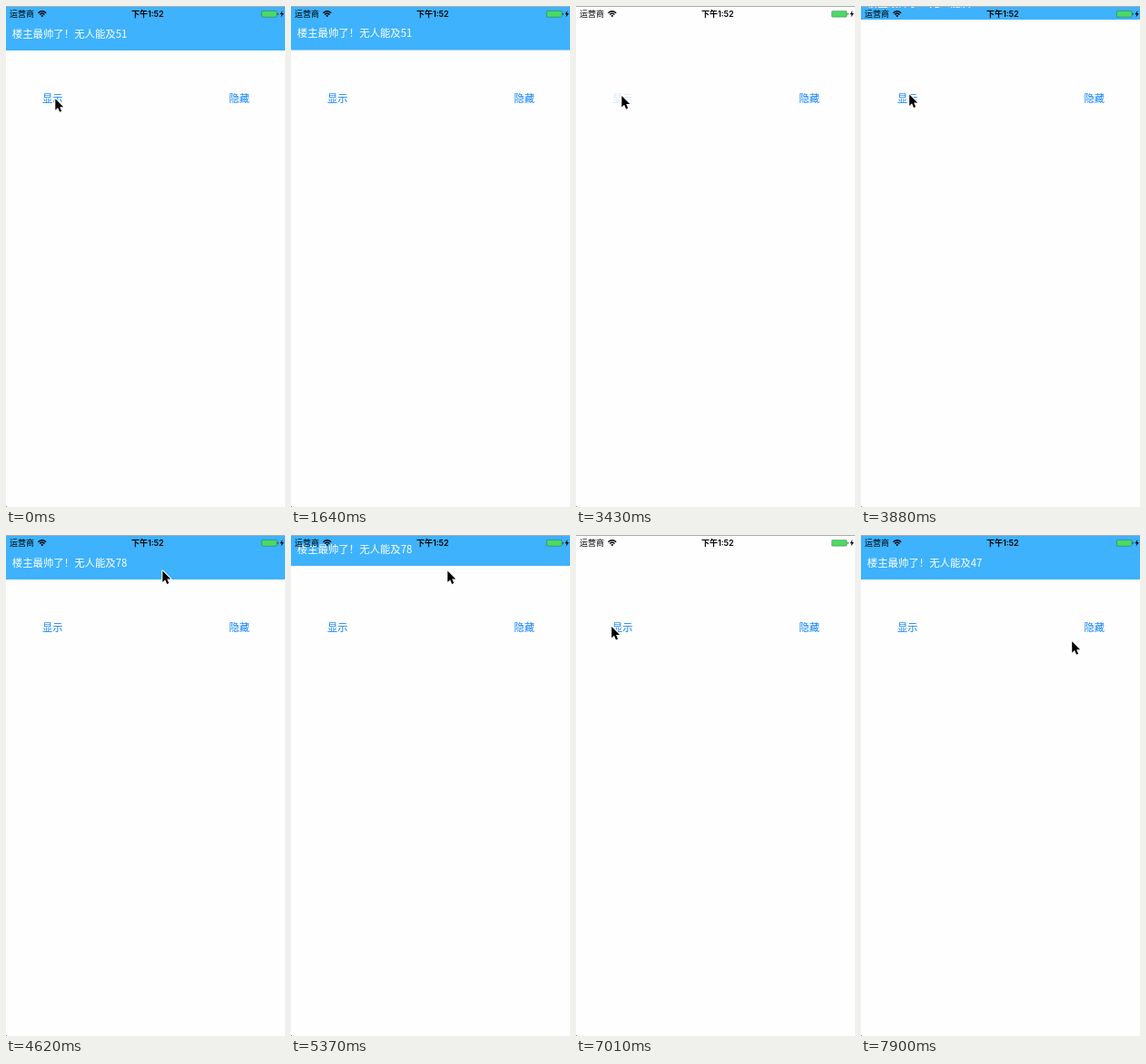
An HTML page that plays this animation: 307x552 px, repeating every 8 s.

```html
<!DOCTYPE html>
<html lang="zh-CN">
<head>
<meta charset="utf-8">
<title>Banner</title>
<style>
  html, body { margin: 0; width: 100%; height: 100%; overflow: hidden; background: #fefefe; }
  svg { display: block; width: 307px; height: 552px; }
  text { font-family: "Noto Sans CJK SC", "Noto Sans CJK", sans-serif; }
  .button { font-size: 11.2px; fill: #0a7ffb; }
  .status { font-size: 9px; }
  .clock { font-family: Inter, "Noto Sans CJK SC", sans-serif; font-weight: 600; text-anchor: middle; }
</style>
</head>
<body>
<svg viewBox="0 0 307 552">
  <rect width="307" height="552" fill="#fefefe"/>
  <text id="show" class="button" x="40" y="106.4">显示</text>
  <text class="button" x="245.6" y="106.4">隐藏</text>

  <g id="banner">
    <rect y="1" width="307" height="48" fill="#3eb2fc"/>
    <text id="message" x="6.8" y="34.9" font-size="11.4" fill="#fff"></text>
  </g>

  <g id="status">
    <text class="status" x="4.1" y="12">运营商</text>
    <g fill="none" stroke="#000" stroke-width="1.3">
      <path d="M35.4 7.7Q39.8 3.8 44.2 7.7"/>
      <path d="M37.1 9.5Q39.8 7.1 42.5 9.5"/>
    </g>
    <path d="M38.3 10.7Q39.8 9.5 41.3 10.7L39.8 12.2Z"/>
    <text class="status clock" x="155.8" y="12">下午1:52</text>
    <rect x="281.4" y="5.4" width="16.6" height="6.8" rx="1.2" fill="#4cd964" stroke="#000" stroke-opacity=".4" stroke-width=".6"/>
    <path d="M298.7 7.4q1 .3 1 1.4t-1 1.4z" fill="#333"/>
    <path d="M304.4 5L301.4 9.2H303.3L302.6 12.6L305.8 8.1H303.8Z"/>
  </g>
  <rect width="307" height="1" fill="#adadad"/>
  <rect y="551" width="1" height="1" fill="#888"/>

  <g id="cursor" stroke-linejoin="round">
    <use href="#arrow" y="1" opacity=".2"/>
    <path id="arrow" d="M0 0V12.4L2.8 9.8L4.8 14.4L6.9 13.5L4.9 9H8.9Z"
          stroke="#fff" stroke-width="2" paint-order="stroke"/>
  </g>
</svg>
<script>
  const LOOP = 8000;
  const TICK = 149;         // the screen is refreshed at this interval
  const SLIDE = 500;        // banner travel time
  const PRESSES = [3420, 7010];
  const SHOW_DELAY = 270;   // from press to banner
  const HIDES = [1612, 5180];
  const SCORES = [51, 78, 47];

  const $ = id => document.getElementById(id);
  const banner = $("banner"), message = $("message"), show = $("show"), cursor = $("cursor");

  const clamp = p => Math.min(1, Math.max(0, p));
  const ramp = (t, from, to) => {
    const p = clamp((t - from) / (to - from));
    return p * p * (3 - 2 * p);
  };
  const sum = (list, f) => list.reduce((total, v) => total + f(v), 0);

  // Starts at a point and glides to others, each within its own time span
  function pathFrom(x, y) {
    const glides = [];
    return {
      to(x, y, from, until) {
        glides.push({ x, y, from, until });
        return this;
      },
      at(t) {
        return glides.reduce(([px, py], g) => {
          const p = ramp(t, g.from, g.until);
          return [px + (g.x - px) * p, py + (g.y - py) * p];
        }, [x, y]);
      }
    };
  }

  const hand = pathFrom(54.3, 102.3)
    .to(165, -20, 850, 1490)      // leaves over the top edge
    .to(50.3, 99, 2200, 2820)     // back to the show button
    .to(172.3, 39.5, 3800, 4600)
    .to(197.3, 66, 5480, 5811)
    .to(239, 102, 5811, 6250)     // near the hide button
    .to(28.5, 103.5, 6270, 6700)
    .to(39.2, 101, 6720, 7000)
    .to(232.2, 117.3, 7380, 7890);

  function draw(time) {
    const t = Math.floor(time / TICK) * TICK;
    const slide = start => ramp(t, start, start + SLIDE);
    const shown = 1 + sum(PRESSES, p => slide(p + SHOW_DELAY)) - sum(HIDES, slide);
    const dim = sum(PRESSES, p => t < p ? 0 : 1 - ramp(t, p + 230, p + 380));

    message.textContent = "楼主最帅了！无人能及" + SCORES[PRESSES.filter(p => p <= t).length];
    banner.setAttribute("transform", `translate(0 ${(shown - 1) * 49})`);
    show.setAttribute("opacity", 1 - .84 * dim);
    cursor.setAttribute("transform", `translate(${hand.at(t).join(" ")})`);
  }

  const start = performance.now();
  function frame() {
    draw((performance.now() - start) % LOOP);
    requestAnimationFrame(frame);
  }
  frame();
</script>
</body>
</html>
```
